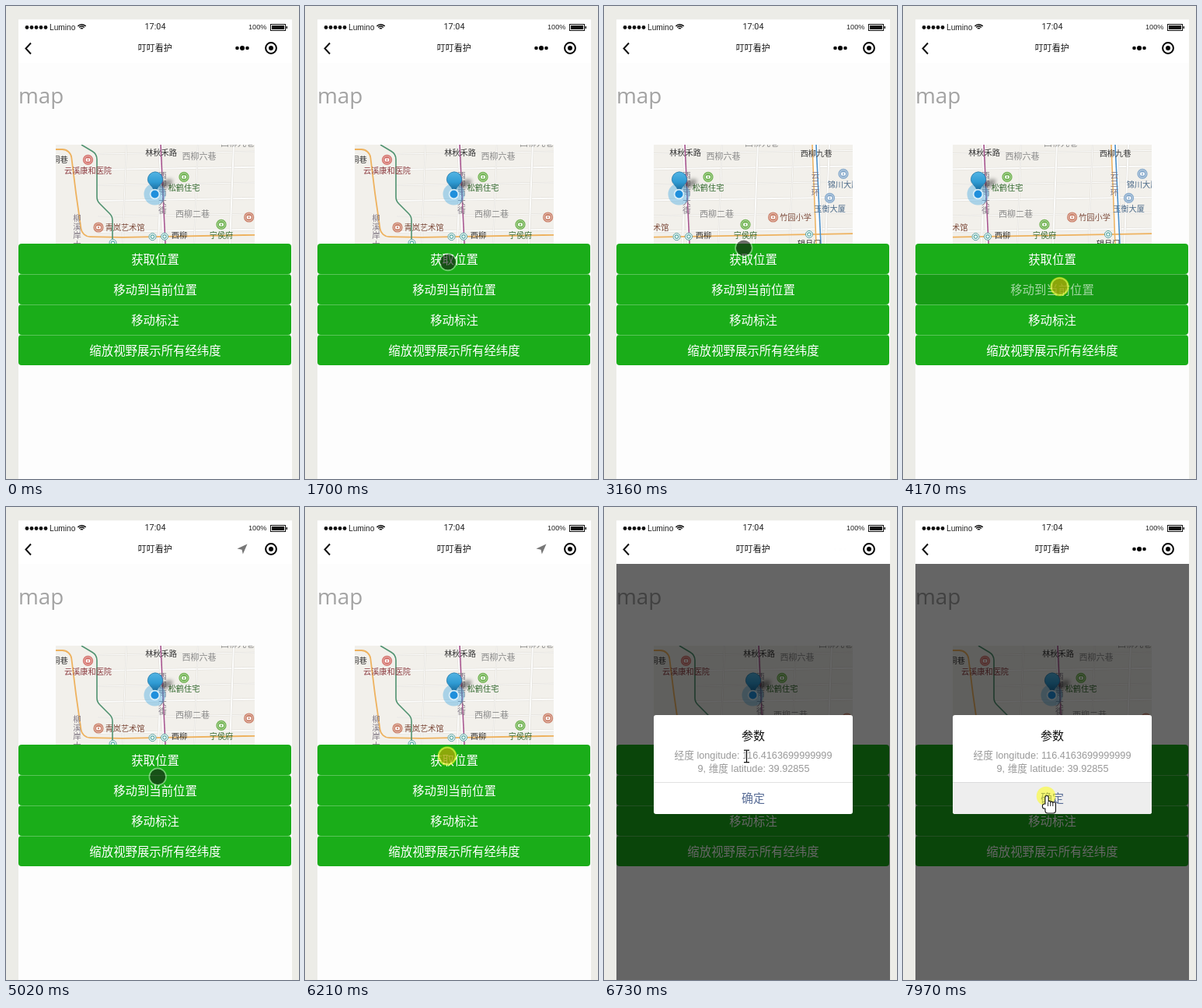
Write an HTML page with a canvas that moves like this. It is 377x607 px and loops after 8000 ms.

```html
<!DOCTYPE html>
<html lang="zh">
<head>
<meta charset="utf-8">
<title>map</title>
<style>
html, body { margin: 0; width: 100%; height: 100%; overflow: hidden; background: #ecece7; }
canvas { display: block; width: 377px; height: 607px; }
</style>
</head>
<body>
<canvas id="stage"></canvas>
<script>
const W = 377, H = 607, LOOP = 8000, TAU = Math.PI * 2;
const canvas = document.getElementById('stage');
const ctx = canvas.getContext('2d');
const dpr = window.devicePixelRatio || 1;
canvas.width = W * dpr;
canvas.height = H * dpr;

const SANS = '"Liberation Sans", "Noto Sans CJK SC", "Noto Sans CJK", sans-serif';
const MAP = { x: 64, y: 178, w: 256, h: 127, right: 440, bottom: 305 };
const TILE_EDGE = 358;
const DRAG = 95;

const ORIGIN = { x: 274.5, y: 569 };
// Each move: from, to (ms), end point
const MOVES = [
  [150, 800, 163, 324], [850, 1000, 163, 366], [1690, 1700, 183.5, 329],
  [1700, 2100, 252, 258], [2240, 2860, 252 - DRAG, 258], [3010, 3550, 201.5, 360],
  [4860, 5790, 183, 319.5], [6730, 7360, 184, 371]
];
const PRESSES = [[2240, 3010], [3870, 4260], [6030, 6280], [7970, LOOP]];

const BUTTONS = ['获取位置', '移动到当前位置', '移动标注', '缩放视野展示所有经纬度'];

// pin: 'top' sits above the name, 'left' before it
const KINDS = {
  lane: { color: '#8a8a8a', size: 11 },
  stop: { color: '#333' },
  clinic: { color: '#8d3d42', pin: 'top', mark: '#d4716b' },
  culture: { color: '#7c4a3a', pin: 'left', mark: '#cb826b' },
  sight: { color: '#33692f', pin: 'top', mark: '#6fb24f' },
  tower: { color: '#4c6b8a', pin: 'top', mark: '#86a9cb' }
};
const PLACES = [
  ['林秋禾路', 'stop', 199.5, 188], ['桐巷', 'stop', 69.5, 197],
  ['西柳', 'stop', 223, 294], ['西柳九巷', 'stop', 368, 189],
  ['望月门', 'stop', 359, 305], ['西柳六巷', 'lane', 248.5, 193],
  ['西柳九巷', 'lane', 298, 175.5], ['西柳二巷', 'lane', 240, 266.5],
  ['云溪康和医院', 'clinic', 105.5, 211], ['青岚艺术馆', 'culture', 153, 284],
  ['竹园小学', 'culture', 341.5, 271], ['松鹤住宅', 'sight', 229, 233],
  ['宁侯府', 'sight', 277, 294], ['锦川大厦', 'tower', 403, 229],
  ['玉衡大厦', 'tower', 385.5, 260]
];

const within = (t, from, to) => t >= from && t < to;
const ramp = (t, from, to) => Math.min(1, Math.max(0, (t - from) / (to - from)));
const easeOut = p => 1 - (1 - p) ** 2.2;
const avenueY = x => 299.5 - x * 0.018;

function cursorAt(t) {
  let { x, y } = ORIGIN;
  for (const [from, to, endX, endY] of MOVES) {
    const p = easeOut(ramp(t, from, to));
    x += (endX - x) * p;
    y += (endY - y) * p;
  }
  return { x, y };
}

function box(x, y, w, h, color) {
  ctx.fillStyle = color;
  ctx.fillRect(x, y, w, h);
}

function rounded(x, y, w, h, r, color) {
  ctx.beginPath();
  ctx.roundRect(x, y, w, h, r);
  ctx.fillStyle = color;
  ctx.fill();
}

function disc(x, y, r, color) {
  ctx.beginPath();
  ctx.arc(x, y, r, 0, TAU);
  ctx.fillStyle = color;
  ctx.fill();
}

function arc(x, y, r, width, color, from = 0, to = TAU) {
  ctx.beginPath();
  ctx.arc(x, y, r, from, to);
  ctx.lineWidth = width;
  ctx.strokeStyle = color;
  ctx.stroke();
}

// Polyline whose corners are rounded by r
function line(points, width, color, r = 0) {
  ctx.beginPath();
  ctx.moveTo(...points[0]);
  for (let i = 1; i < points.length - 1; i++) ctx.arcTo(...points[i], ...points[i + 1], r);
  ctx.lineTo(...points[points.length - 1]);
  ctx.lineWidth = width;
  ctx.strokeStyle = color;
  ctx.stroke();
}

// y is the optical middle of the line
function text(str, x, y, size, color, { align = 'center', family = SANS, weight = 400 } = {}) {
  ctx.font = `${weight} ${size}px ${family}`;
  ctx.textAlign = align;
  ctx.fillStyle = color;
  ctx.fillText(str, x, y + size * 0.37);
}

function withAlpha(alpha, draw) {
  if (alpha <= 0) return;
  ctx.save();
  ctx.globalAlpha = alpha;
  draw();
  ctx.restore();
}

function drawStatusBar() {
  for (let i = 0; i < 5; i++) disc(27 + i * 6, 27.5, 2.4, '#111');
  text('Lumino', 56, 27, 10.2, '#222', { align: 'left' });
  for (let i = 0; i < 3; i++)
    arc(97.5, 30.5, 2 + i * 2.4, 1.5, '#111', -TAU * 0.385, -TAU * 0.115);
  text('17:04', 192, 26.5, 10.8, '#222', { family: 'Roboto, sans-serif' });
  text('100%', 335.5, 27, 9.2, '#222', { align: 'right' });
  ctx.lineWidth = 1;
  ctx.strokeStyle = '#111';
  ctx.strokeRect(340.5, 23.5, 19, 8);
  box(342, 25, 16, 5, '#111');
  box(360.5, 26, 1.5, 3, '#111');
}

function drawNav(t) {
  line([[32, 47.5], [25.5, 54.5], [32, 61.5]], 2, '#111');
  text('叮叮看护', 191.7, 53.5, 11, '#111');
  withAlpha(1 - ramp(t, 4250, 4420) + ramp(t, 6730, 7100), () => {
    for (const i of [-1, 0, 1]) disc(304 + i * 6.5, 54, 3 - Math.abs(i) * 0.7, '#000');
  });

  const blink = Math.min(1, 1.5 * (1 - Math.cos((t - 4130) / 1170 * TAU)));
  withAlpha(within(t, 4250, 6470) ? blink : 0, () => {
    ctx.beginPath();
    for (const p of [[310.5, 47.5], [297.5, 53.5], [303.5, 54.8], [304.8, 60.5]]) ctx.lineTo(...p);
    ctx.fillStyle = '#777';
    ctx.fill();
  });
  arc(341, 54, 6.9, 2, '#000');
  disc(341, 54, 3, '#000');
}

function road(points, width) {
  line(points, width + 1, '#dfdcd6');
  line(points, width, '#fcfcfb');
}

function drawRoads() {
  const { y: top, right, bottom } = MAP;
  for (let i = 0; i < 6; i++) {
    const y = 188 + i * 20;
    road([[118, y + 2], [right, y - 3]], 1 + i % 2);
  }
  for (let i = 0; i < 7; i++) {
    const x = 152 + i * 46;
    road([[x + 3, top], [x - 2, bottom]], 1 + i % 2);
  }
  road([[198, top], [204, bottom]], 4);
  road([[367, top], [372, bottom]], 8);

  const orange = '#eeb25f';
  line([[64, 184], [83, 184], [90, 240], [98, 296], [150, avenueY(150)], [right, avenueY(right)]],
    1.8, orange, 12);
  line([[363, top], [368, bottom]], 1.5, orange);
  line([[97, top], [117, 190], [117, 250], [137, 270], [137, bottom]], 1.6, '#4f9270', 12);
  line([[199, top], [205, bottom]], 1.6, '#a8568f');
  line([[368, top], [374, bottom]], 1.6, '#4a8fc9');
}

function drawStation(x, y) {
  disc(x, y, 5, '#fff');
  arc(x, y, 4.5, 1, '#4f9c9b');
  arc(x, y, 2.2, 1.2, '#58a9a5');
}

function drawPin(x, y, color) {
  disc(x, y, 6.6, color);
  arc(x, y, 4.9, 0.7, 'rgba(255,255,255,.7)');
  rounded(x - 2.8, y - 1.8, 5.6, 4, 1, '#fff');
  disc(x, y + 0.2, 1.1, color);
}

function drawPlace([name, kind, x, y]) {
  const { color, size = 10.2, pin, mark } = KINDS[kind];
  text(name, x, y, size, color);
  if (pin === 'top') drawPin(x, y - 13.6, mark);
  if (pin === 'left') drawPin(x - name.length * size / 2 - 8.5, y, mark);
}

function drawVertical(name, x, y) {
  [...name].forEach((ch, i) => text(ch, x, y + i * 11.3, 10.5, '#807884'));
}

function drawMarker() {
  ctx.save();
  ctx.translate(191.5, 241.5);
  ctx.save();
  ctx.filter = 'blur(2.5px)';
  ctx.beginPath();
  ctx.ellipse(14, -13, 10, 4.5, -0.5, 0, TAU);
  ctx.fillStyle = 'rgba(0,0,0,.4)';
  ctx.fill();
  ctx.restore();

  disc(0, 0, 14, 'rgba(60,165,225,.4)');
  const shade = ctx.createLinearGradient(0, -29, 0, -2);
  shade.addColorStop(0, '#55b5e4');
  shade.addColorStop(0.5, '#2f9bd3');
  shade.addColorStop(1, '#145d8c');
  ctx.beginPath();
  ctx.arc(0.5, -19, 9.6, Math.PI * 0.87, Math.PI * 0.13);
  ctx.quadraticCurveTo(3.5, -9, 0.5, -2);
  ctx.quadraticCurveTo(-2.5, -9, -8.3, -15.2);
  ctx.fillStyle = shade;
  ctx.fill();
  ctx.lineWidth = 0.8;
  ctx.strokeStyle = '#2378a8';
  ctx.stroke();
  disc(0, 0, 6.8, '#d9eef8');
  disc(0, 0, 5, '#1f8fdc');
  ctx.restore();
}

function drawMap(t) {
  const shift = DRAG * (easeOut(ramp(t, 2240, 2860)) - easeOut(ramp(t, 4330, 4640)));
  const loadedTo = t < 3010 ? TILE_EDGE : MAP.right;
  ctx.save();
  ctx.beginPath();
  ctx.rect(MAP.x, MAP.y, MAP.w, MAP.h);
  ctx.clip();
  box(MAP.x, MAP.y, MAP.w, MAP.h, '#e3e3df');
  ctx.translate(-shift, 0);
  ctx.beginPath();
  ctx.rect(0, MAP.y, loadedTo, MAP.h);
  ctx.clip();
  box(0, MAP.y, loadedTo, MAP.h, '#f2f0eb');

  drawRoads();
  drawVertical('西柳南大街', 201.5, 217);
  drawVertical('柳溪岸大街', 91.5, 272);
  drawVertical('云三环', 367, 217);
  for (const x of [188.5, 204, 359]) drawStation(x, avenueY(x));
  drawStation(137.5, 304);
  PLACES.forEach(drawPlace);
  drawMarker();
  ctx.restore();
}

function drawButtons(t) {
  BUTTONS.forEach((label, i) => {
    const y = 305 + i * 39;
    const active = (i === 1 && within(t, 4100, 4260)) || (i === 0 && within(t, 6100, 6200));
    rounded(16, y, 351, 39, 4, active ? '#179b16' : '#1aad19');
    if (i) box(18, y, 347, 0.8, 'rgba(255,255,255,.35)');
    text(label, 192, y + 20, 15.4, active ? 'rgba(255,255,255,.6)' : '#fff', { weight: 500 });
  });
}

function drawModal(t) {
  withAlpha(ramp(t, 6270, 6377), () => {
    box(16, 73, 352, H - 73, 'rgba(0,0,0,.6)');
    rounded(64, 267, 256, 127, 3, '#fff');
    if (t >= 7970) rounded(64, 353, 256, 41, [0, 0, 3, 3], '#eee');
    box(64, 353, 256, 0.7, '#d5d5d6');
    text('参数', 192, 293.5, 15, '#111');
    text('经度 longitude: 116.4163699999999', 192, 318.5, 12.7, '#999');
    text('9, 维度 latitude: 39.92855', 192.5, 335.5, 12.7, '#999');
    text('确定', 192, 373.5, 15, '#576b95');
  });
}

function drawBeam(x, y) {
  for (const [width, color] of [[3, '#fff'], [1.2, '#000']]) {
    line([[x, y - 7], [x, y + 8]], width, color);
    for (const end of [-7.5, 8]) line([[x - 3.5, y + end], [x + 3.5, y + end]], width, color);
  }
}

// Fingers and palm share one outline: stroke all parts, then fill them
function drawHand(x, y) {
  ctx.beginPath();
  for (let i = 0; i < 4; i++) ctx.roundRect(x - 1 + i * 3.1, y + (i && 6.5 + i * 0.6), 3.1, 12, 1.5);
  ctx.roundRect(x - 4.5, y + 10.5, 5, 5, 2);
  ctx.roundRect(x - 1, y + 11, 12.4, 10.5, [1, 1, 3, 3]);
  ctx.lineWidth = 2.2;
  ctx.strokeStyle = '#111';
  ctx.stroke();
  ctx.fillStyle = '#fff';
  ctx.fill();
  for (let i = 1; i < 4; i++) line([[x - 1 + i * 3.1, y + 8], [x - 1 + i * 3.1, y + 13]], 0.9, '#111');
}

function drawCursor(t) {
  if (t < 150) return;
  const { x, y } = cursorAt(t);
  const touch = t < 6280;
  if (touch) {
    disc(x, y, 10, 'rgba(20,20,20,.6)');
    arc(x, y, 10.8, 1.6, 'rgba(255,255,255,.4)');
  }
  if (PRESSES.some(([from, to]) => within(t, from, to))) disc(x, y, 12.3, 'rgba(255,255,0,.5)');
  if (!touch) (y < 353 ? drawBeam : drawHand)(x + 0.5, y);
}

function draw(t) {
  ctx.setTransform(dpr, 0, 0, dpr, 0, 0);
  box(0, 0, W, H, '#ecece7');
  box(16, 17.5, 352, H - 17.5, '#fdfdfd');
  box(16, 17.5, 352, 55.5, '#fff');
  drawStatusBar();
  drawNav(t);
  text('map', 16, 114.5, 27.8, '#a3a3a3',
    { align: 'left', family: '"Open Sans", "Noto Sans", sans-serif' });
  drawMap(t);
  drawButtons(t);
  drawModal(t);
  drawCursor(t);
}

const start = performance.now();
function tick() {
  draw((performance.now() - start) % LOOP);
  requestAnimationFrame(tick);
}
tick();
</script>
</body>
</html>
```
